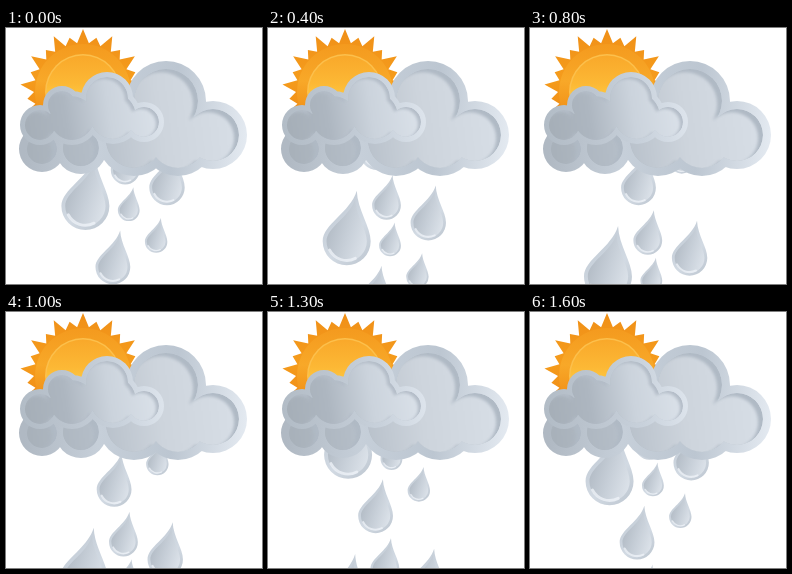
An HTML page with a canvas that plays this animation: 256 by 256 pixels, repeating every 1.7 s.

```html
<!DOCTYPE html>
<html lang="en">
<head>
<meta charset="utf-8">
<title>Sun, cloud and rain</title>
<style>
html, body { margin: 0; width: 100%; height: 100%; overflow: hidden; background: #fff; }
canvas { display: block; width: 256px; height: 256px; }
</style>
</head>
<body>
<canvas id="stage" width="256" height="256"></canvas>
<script>
const ctx = document.getElementById('stage').getContext('2d');
const STEP = 100, STEPS = 17;
const SPEED = 8.8, DRIFT = -0.02;   // px per step, px sideways per px fallen
const HIDDEN = 70, EMERGE = 147;    // tip heights: behind the cloud, just below it

// x of the body, radius, and the step at which the tip leaves the cloud
const drops = [
  { x: 79, r: 24, when: 2.2 },
  { x: 108, r: 17.4, when: 10.7 },
  { x: 118.5, r: 14.4, when: 4 },
  { x: 123, r: 10.9, when: 15.6 },
  { x: 160.5, r: 17.7, when: 2.8 },
  { x: 151, r: 11.2, when: 12.1 }
];

// lobes as [x, y, radius]
const backLobes = [[36, 121, 23], [75, 120, 26], [128, 112, 36],
  [172, 112, 36], [160, 73, 40], [207, 107, 34]];
const frontLobes = [[34, 97, 20], [56, 77, 19], [66, 90, 27],
  [101, 70, 26], [107, 88, 28], [138, 94, 20]];

function linear(x0, y0, x1, y1, ...colors) {
  const g = ctx.createLinearGradient(x0, y0, x1, y1);
  colors.forEach((c, i) => g.addColorStop(i / (colors.length - 1), c));
  return g;
}

function fill(path, style) {
  ctx.fillStyle = style;
  ctx.fill(path);
}

function lobesPath(lobes, inset = 0) {
  const path = new Path2D();
  for (const [x, y, r] of lobes) {
    path.moveTo(x + r - inset, y);
    path.arc(x, y, r - inset, 0, Math.PI * 2);
  }
  return path;
}

function drawSun() {
  const x = 77, y = 64, rays = 26;
  const star = new Path2D();
  for (let i = 0; i < rays * 2; i++) {
    const a = (i / rays - 0.5) * Math.PI;
    const r = i % 2 ? 49 : i % 4 ? 56 : 63;
    star.lineTo(x + Math.cos(a) * r, y + Math.sin(a) * r);
  }
  fill(star, linear(0, 2, 0, 100, '#f09018', '#f59c1c', '#ee8612'));
  fill(lobesPath([[x, y, 48]]), linear(0, 16, 0, 90, '#f49a1e', '#f8a828', '#f08c14'));
  fill(lobesPath([[x, y, 38]]), '#fcc04c');
  fill(lobesPath([[x, y, 36.5]]), linear(0, 27, 0, 84, '#f9a82a', '#fcb835', '#ffd84c'));
}

function drawCloud(lobes, inset, rim, body, shade) {
  const inner = lobesPath(lobes, inset);
  fill(lobesPath(lobes), rim);
  ctx.save();
  ctx.clip(inner);
  fill(inner, shade);
  ctx.translate(-inset * 0.6, inset * 0.4);
  ctx.filter = 'blur(1.5px)';
  fill(inner, body);
  ctx.restore();
}

function drawClouds() {
  drawCloud(backLobes, 8,
    linear(20, 110, 240, 125, '#b0b9c3', '#c6cfd9', '#bcc6d1', '#e4eaf1'),
    linear(20, 125, 230, 100, '#a6afb8', '#b4bdc7', '#cdd4dc', '#d6dde5'),
    '#b0bac5');
  drawCloud(frontLobes, 5,
    linear(15, 100, 158, 85, '#b2bcc6', '#bcc5cf', '#c8d1db', '#dde4ec'),
    linear(20, 100, 150, 80, '#a5aeb7', '#adb6c0', '#cbd3dc', '#d9e0e8'),
    '#b4bdc8');
}

// Teardrop around a body centred on the origin
function dropPath(r) {
  const path = new Path2D();
  path.moveTo(r * 0.42, -r * 2.1);
  path.bezierCurveTo(r * 0.45, -r * 1.3, r, -r * 0.6, r, 0);
  path.arc(0, 0, r, 0, Math.PI);
  path.bezierCurveTo(-r, -r * 0.7, r * 0.15, -r * 1.2, r * 0.42, -r * 2.1);
  return path;
}

function drawDrop(x, tip, r) {
  ctx.save();
  ctx.translate(x, tip + r * 2.1);
  fill(dropPath(r), linear(-r, -r, r, r, '#c3ccd6', '#d2dae3', '#bcc5cf'));
  fill(dropPath(r * 0.84), linear(-r, -r * 0.3, r, r * 0.3, '#b0b9c3', '#c8d0d9', '#e0e6ed'));
  ctx.strokeStyle = 'rgba(240,244,249,.75)';
  ctx.lineWidth = r * 0.12;
  ctx.lineCap = 'round';
  ctx.beginPath();
  ctx.arc(0, 0, r * 0.8, Math.PI * 0.35, Math.PI * 0.85);
  ctx.stroke();
  ctx.restore();
}

function frame(now) {
  const step = Math.floor(now / STEP) % STEPS;
  const lap = SPEED * STEPS;
  ctx.fillStyle = '#fff';
  ctx.fillRect(0, 0, 256, 256);
  for (const { x, r, when } of drops) {
    const fallen = EMERGE - HIDDEN + (step - when) * SPEED;
    const first = HIDDEN + (fallen % lap + lap) % lap;
    for (const tip of [first, first + lap]) {
      drawDrop(x + (tip - EMERGE) * DRIFT, tip, r);
    }
  }
  drawSun();
  drawClouds();
}

const start = performance.now();
function tick() {
  frame(performance.now() - start);
  requestAnimationFrame(tick);
}
tick();
</script>
</body>
</html>
```
